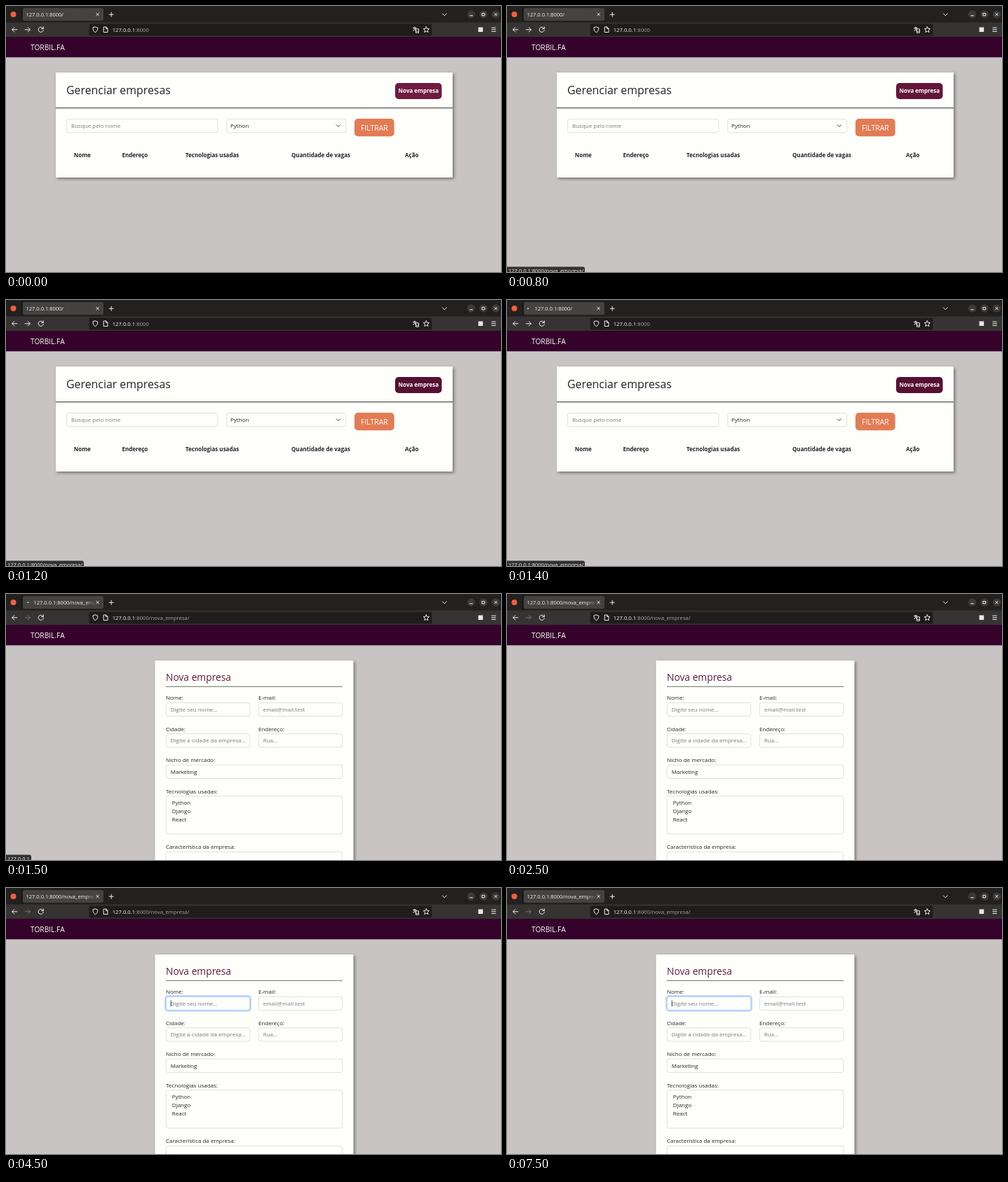
Animation of 706 by 380 pixels, one loop 8 s. Source, as an HTML page:

```html
<!DOCTYPE html>
<html lang="pt-BR">
<head>
<meta charset="utf-8">
<title>Nova empresa</title>
<style>
html, body { margin: 0; width: 100%; height: 100%; overflow: hidden; background: #c8c4c4; }
svg { display: block; width: 706px; height: 380px; }
text { font-family: "Open Sans", "Noto Sans", sans-serif; font-size: 8px; fill: #212529; white-space: pre; }
.bold { font-weight: 700; }
.h1 { font-size: 15.9px; font-weight: 500; }
.h2 { font-size: 13.8px; font-weight: 500; fill: #5c1a3c; }
.hint { fill: #727a80; }
.ui { font-size: 7.5px; fill: #f4f4f2; }
.url { font-size: 7.7px; fill: #a5a4a2; }
.url .host { fill: #f8f8f6; }
.brand { font-size: 10.2px; fill: #fff; }
.on-dark { fill: #fff; }
.field { fill: #fefffb; stroke: #d0d5d4; stroke-width: .7; }
.icon { fill: none; stroke: #f0efed; stroke-width: 1; stroke-linecap: round; stroke-linejoin: round; }
.dim { stroke: #777573; }
.card { fill: #fefffb; filter: drop-shadow(2px 2px 2px rgba(0,0,0,.42)); }

/* One loop is 8 s, so 1% is 80 ms. */
.list, .form, .link, .host-status, .spinner, .translate, .tab-title, .cta, .focus, .caret {
  animation: 8s step-end infinite;
}
.list { animation-name: list; }
.form { animation-name: form; }
.link { animation-name: link; }
.host-status { animation-name: host-status; }
.spinner { animation-name: spinner; }
.translate { animation-name: translate; }
.tab-title { animation-name: tab-title; }
.cta { fill: #701b40; animation-name: cta; }
.focus { animation-name: focus; }
.caret { animation-name: caret; }
@keyframes list { 0% { opacity: 1 } 18.75%, 100% { opacity: 0 } }
@keyframes form { 0% { opacity: 0 } 18.75%, 100% { opacity: 1 } }
@keyframes link { 0% { opacity: 0 } 10% { opacity: 1 } 18.75%, 100% { opacity: 0 } }
@keyframes host-status { 0% { opacity: 0 } 18.75% { opacity: 1 } 31.25%, 100% { opacity: 0 } }
@keyframes spinner {
  0% { opacity: 0 }
  17.5% { opacity: 1; transform: none }
  18.75% { opacity: 1; transform: translateX(1.5px) }
  31.25%, 100% { opacity: 0 }
}
@keyframes translate { 0% { opacity: 1 } 18.75% { opacity: 0 } 31.25%, 100% { opacity: 1 } }
@keyframes tab-title {
  0% { transform: none }
  17.5% { transform: translateX(11px) }
  31.25%, 100% { transform: none }
}
@keyframes cta {
  0% { fill: #701b40 }
  8.75% { fill: #701b40; animation-timing-function: steps(4, start) }
  12.5%, 100% { fill: #561033 }
}
@keyframes focus {
  0% { opacity: 0 }
  31.25% { opacity: 0; animation-timing-function: steps(3, end) }
  35%, 100% { opacity: 1 }
}
@keyframes caret { 0% { opacity: 0 } 32.5%, 100% { opacity: 1 } }
</style>
</head>
<body>
<svg viewBox="0 0 706 380">
  <defs>
    <linearGradient id="fade">
      <stop offset="0" stop-color="#454342" stop-opacity="0"/>
      <stop offset="1" stop-color="#454342"/>
    </linearGradient>
    <clipPath id="tabClip"><rect x="26" y="3" width="101" height="18"/></clipPath>
  </defs>
  <rect width="706" height="380" fill="#c8c4c4"/>

  <!-- browser -->
  <rect width="706" height="24" fill="#222120"/>
  <rect y="23.5" width="706" height="20.5" fill="#353432"/>
  <circle cx="10.5" cy="12" r="4" fill="#f0603c"/>
  <path d="M22.5 1V22" stroke="#111" stroke-width="1"/>
  <rect x="24" y="3" width="115" height="18" rx="2.5" fill="#454342"/>
  <circle class="spinner" cx="30" cy="12" r="1.1" fill="#d8d7d5"/>
  <g clip-path="url(#tabClip)">
    <g class="tab-title">
      <text class="ui list" x="28.5" y="14.8">127.0.0.1:8000/</text>
      <text class="ui form" x="28.5" y="14.8">127.0.0.1:8000/nova_empresa/</text>
    </g>
  </g>
  <rect x="114" y="4" width="13.5" height="16" fill="url(#fade)"/>
  <g class="icon">
    <path d="M128.8 10.2l3.6 3.6m0-3.6l-3.6 3.6M147.2 12.2h6m-3-3v6M622.3 10.8l3 3 3-3"/>
    <path d="M15.8 33.8H8.6m3.2-3.2l-3.2 3.2 3.2 3.2"/>
    <path class="list" d="M27.2 33.8h7.2m-3.2-3.2l3.2 3.2-3.2 3.2"/>
    <path class="form dim" d="M27.2 33.8h7.2m-3.2-3.2l3.2 3.2-3.2 3.2"/>
    <path d="M52.6 31.6a3.6 3.6 0 1 0 .7 2.6M53.3 29.8v2.7h-2.8"/>
  </g>
  <rect x="118.5" y="25.5" width="489" height="17" rx="2.5" fill="#1e1d1c"/>
  <g class="icon" stroke-width=".9">
    <path d="M127.4 29.9l3.4 1.2c0 3.4-1 5.2-3.4 6.6-2.4-1.4-3.4-3.2-3.4-6.6z"/>
    <path d="M139.6 30h3.2l2.2 2.2v5.3h-5.4zM142.6 30.2v2.2h2.2"/>
    <path d="M599.4 29.7l1.2 2.6 2.9.3-2.2 2 .7 2.9-2.6-1.5-2.6 1.5.7-2.9-2.2-2 2.9-.3z"/>
    <path d="M692.8 31h5.6m-5.6 2.7h5.6m-5.6 2.7h5.6"/>
  </g>
  <g class="icon translate" stroke-width=".8">
    <path d="M580.6 31.3h4.4m-2.2-1.3v1.3m1.4 0c-.4 1.8-1.6 3-3.4 3.7m.6-3.4c.6 1.6 1.6 2.6 2.8 3.2"/>
    <path d="M584.5 37.8v-5h4v5zm1.2-1.6h1.6"/>
  </g>
  <rect x="673.6" y="30.4" width="6.6" height="6.6" fill="#e8e7e5"/>
  <g fill="#3b3a38"><circle cx="663.5" cy="12" r="5.8"/><circle cx="681" cy="12" r="5.8"/><circle cx="698.5" cy="12" r="5.8"/></g>
  <path class="icon" stroke-width=".9" d="M661.6 13.8h3.8M679.3 10.4h3.4v3.4h-3.4zM696.8 10.3l3.4 3.4m0-3.4l-3.4 3.4"/>
  <text class="url" x="151.7" y="36.8"><tspan class="host">127.0.0.1</tspan>:8000<tspan class="form">&#8203;</tspan></text>
  <g class="form">
    <rect x="150" y="28" width="118" height="12" fill="#1e1d1c"/>
    <text class="url" x="151.7" y="36.8"><tspan class="host">127.0.0.1</tspan>:8000/nova_empresa/</text>
  </g>

  <!-- page header -->
  <rect y="44" width="706" height="29.3" fill="#35022b"/>
  <text class="brand" x="35" y="63">TORBIL.FA</text>

  <!-- company list -->
  <g class="list">
    <rect class="card" x="71" y="95" width="566" height="150"/>
    <text class="h1" x="86" y="126">Gerenciar empresas</text>
    <rect class="cta" x="555" y="110" width="66.5" height="23" rx="5"/>
    <text class="bold on-dark" x="588.3" y="124.2" text-anchor="middle">Nova empresa</text>
    <path d="M71 145.7h566" stroke="#2b2e2d" stroke-width="1"/>
    <rect class="field" x="86.5" y="161.5" width="215.5" height="19.3" rx="3"/>
    <text class="hint" x="93" y="174.2">Busque pelo nome</text>
    <rect class="field" x="314.8" y="161.5" width="170" height="19.3" rx="3"/>
    <text x="320" y="174.2">Python</text>
    <path class="icon" style="stroke:#343a40" d="M471.3 169.9l2.6 2.6 2.6-2.6"/>
    <rect x="497" y="161" width="56.7" height="25.3" rx="5" fill="#e27c55"/>
    <text class="on-dark" style="font-size:10.4px" x="525.4" y="177.7" text-anchor="middle">FILTRAR</text>
    <g class="bold">
      <text x="96.7" y="216">Nome</text>
      <text x="165.5" y="216">Endereço</text>
      <text x="256" y="216">Tecnologias usadas</text>
      <text x="407" y="216">Quantidade de vagas</text>
      <text x="569" y="216">Ação</text>
    </g>
  </g>

  <!-- new company form -->
  <g class="form">
    <rect class="card" x="212.5" y="95" width="283" height="300"/>
    <text class="h2" x="228" y="124.2">Nova empresa</text>
    <path d="M228 132.3h252" stroke="#646b64" stroke-width="1.1"/>
    <text x="228" y="151.3">Nome:</text>
    <text x="360" y="151.3">E-mail:</text>
    <rect class="field" x="228.3" y="155.3" width="119.5" height="19.3" rx="3"/>
    <rect class="field" x="360.3" y="155.3" width="119.5" height="19.3" rx="3"/>
    <g class="focus">
      <rect x="227.2" y="154.2" width="121.7" height="21.5" rx="4" fill="none" stroke="#c2d9fd" stroke-width="2.2"/>
      <rect class="field" x="228.3" y="155.3" width="119.5" height="19.3" rx="3" style="stroke:#86b7fe"/>
    </g>
    <text class="hint" x="234.7" y="167.6">Digite seu nome...</text>
    <path class="caret" d="M235.2 160.3v9.2" stroke="#212529" stroke-width=".8"/>
    <text class="hint" x="366.7" y="167.6">email@mail.test</text>

    <text x="228" y="195.8">Cidade:</text>
    <text x="360" y="195.8">Endereço:</text>
    <rect class="field" x="228.3" y="199.7" width="119.5" height="19.3" rx="3"/>
    <rect class="field" x="360.3" y="199.7" width="119.5" height="19.3" rx="3"/>
    <text class="hint" x="234.7" y="212">Digite a cidade da empresa...</text>
    <text class="hint" x="366.7" y="212">Rua...</text>

    <text x="228" y="240.3">Nicho de mercado:</text>
    <rect class="field" x="228.3" y="244.2" width="251.5" height="19.3" rx="3"/>
    <text x="234.7" y="256.6">Marketing</text>

    <text x="228" y="284.8">Tecnologias usadas:</text>
    <rect class="field" x="228.3" y="288.8" width="251.5" height="54.3" rx="3"/>
    <text x="236.8" y="300.9">Python</text>
    <text x="236.8" y="312.9">Django</text>
    <text x="236.8" y="324.9">React</text>

    <text x="228" y="364.3">Característica da empresa:</text>
    <rect class="field" x="228.3" y="368.5" width="251.5" height="40" rx="3"/>
  </g>

  <!-- link status -->
  <g class="link">
    <path d="M0 372.5h108a3 3 0 0 1 3 3V380H0z" fill="#333230"/>
    <text class="ui" x="2" y="381.3">127.0.0.1:8000/nova_empresa/</text>
  </g>
  <g class="host-status">
    <path d="M0 372.5h33a3 3 0 0 1 3 3V380H0z" fill="#333230"/>
    <text class="ui" x="2" y="381.3">127.0.0.1</text>
  </g>
</svg>
</body>
</html>
```
